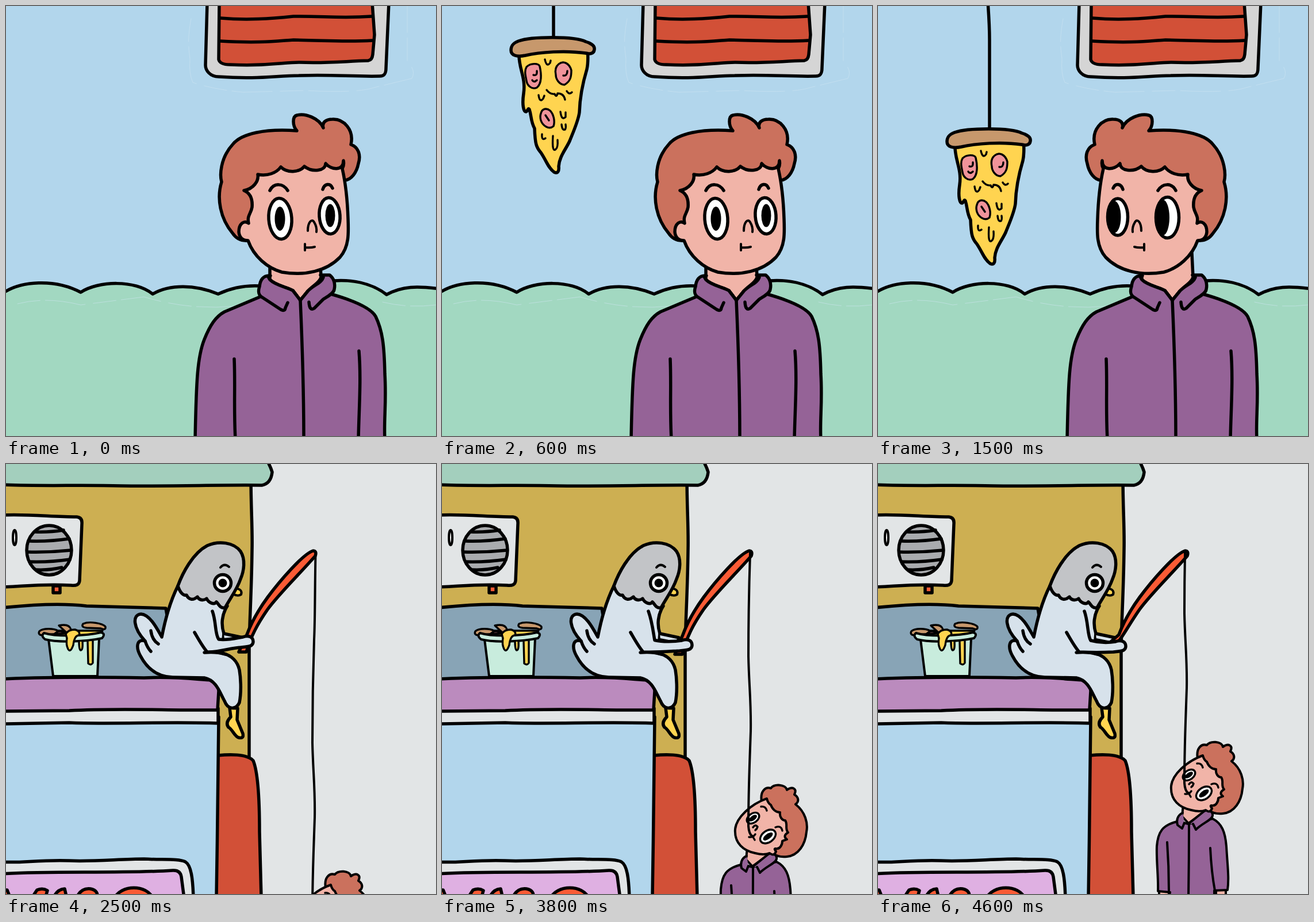
An HTML page that plays this animation: 748 px wide and 748 px high, repeating every 4700 ms.

```html
<!DOCTYPE html>
<html lang="en">
<head>
<meta charset="utf-8">
<title>Street fishing</title>
<style>
  html, body { margin: 0; width: 100%; height: 100%; overflow: hidden; background: #b2d6ec; }
  svg { display: block; width: 100%; height: 100%; }
  .ink { stroke: #000; stroke-width: 5.5; stroke-linecap: round; stroke-linejoin: round; fill: none; }
  .thin { stroke-width: 4; }
  .fine { stroke-width: 3.4; }
  .flat { stroke: none; }
  .faint { stroke: #cfe6f2; stroke-width: 1; opacity: .55; stroke-dasharray: 40 9 70 14; }
  .sky { fill: #b2d6ec; }
  .mist { fill: #e2e5e6; }
  .bush { fill: #a2d8c1; }
  .red { fill: #d25037; }
  .rod { fill: #fa5b35; }
  .hair { fill: #cb715d; }
  .skin { fill: #f1b4a8; }
  .shirt { fill: #956397; }
  .white { fill: #fff; }
  .black { fill: #000; stroke: none; }
  .crust { fill: #c7986c; }
  .cheese { fill: #ffd450; }
  .meat { fill: #f0939a; }
  .feather { fill: #d7e2eb; }
  .mint { fill: #c8ecdd; }
</style>
</head>
<body>
<svg viewBox="0 0 748 748" preserveAspectRatio="none">
  <defs>
    <clipPath id="belowTip"><path d="M0 154H748V748H0z"/></clipPath>
    <g id="headShape">
      <path class="hair" d="M420 408C408 409 400 404 394 395C373 370 366 335 375 306C372 295 372 265 395 240C410 222 450 213 506 217C498 208 498 192 506 190C520 186 545 195 552 212C549 203 556 197 568 197C587 196 606 215 600 241C612 245 618 258 613 274C610 290 600 303 589 303L570 290Z"/>
      <path class="skin" d="M421 408C431 436 455 456 480 463C520 470 558 461 581 437C597 419 596 395 595 370C594 340 590 305 585 283C588 278 588 274 587 269C587 287 566 286 556 274C556 287 533 290 519 279C510 290 489 291 478 280C470 291 455 296 438 293C440 305 430 318 414 321C426 326 429 338 428 350C426 362 419 364 422 378C415 372 405 378 405 393C406 403 411 408 421 408Z"/>
      <path d="M459 321C466 307 482 308 490 321M551 319C554 309 564 307 568 317"/>
    </g>
    <path id="noseMouth" class="thin" d="M525 391C525 376 532 369 536 376C539 381 541 386 540 393M520 414L520 425M521 420Q530 421 537 419"/>
  </defs>

  <g id="street" class="ink">
    <path class="sky flat" d="M0 0H748V748H0z"/>
    <path class="faint" d="M322 22C315 60 318 75 320 92Q318 118 325 133Q360 145 412 150L520 147Q610 152 640 142L706 126Q714 112 698 97V0"/>
    <path class="bush" d="M-6 500C25 478 85 474 130 498C160 478 225 476 255 501C285 484 328 484 369 501C395 489 420 486 441 487L570 478C600 476 635 481 662 502C690 487 715 487 754 492V754H-6Z"/>
    <path class="faint" d="M20 518Q70 505 130 520L240 506Q320 530 400 522M655 515Q700 526 748 520"/>

    <path fill="#d5d5d5" d="M350 -6L347 103C347 112 355 123 370 123C440 128 470 121 510 121C570 119 600 123 650 122C658 122 661 118 661 108L666 -6Z"/>
    <path class="red" d="M371 -6L370 93Q372 102 390 102C460 105 480 98 510 98C560 100 590 96 630 95Q637 94 638 84L641 50L637 -6Z"/>
    <path d="M373 21C420 25 460 22 500 18C550 17 580 22 636 18M373 61C440 65 470 61 500 59C560 60 590 63 637 60"/>

    <g id="pizza">
      <path d="M190 -180Q194 -130 194 -100V56"/>
      <path class="cheese" d="M134 70V86C134 110 146 125 142 152C139 172 142 184 146 184C149 184 149 176 152 180C156 192 154 200 161 213C162 240 164 246 172 255C182 270 185 282 195 289C201 292 204 288 203 279C204 262 215 250 222 235C230 215 237 200 239 185C240 150 249 120 252 110Q255 97 253 70Z"/>
      <path class="crust" d="M133 61C155 53 230 52 250 62C262 66 266 70 265 76C264 83 258 84 250 82C215 77 170 80 145 86C130 89 120 86 120 77C120 68 125 64 133 61Z"/>
      <g class="fine">
        <path class="meat" d="M147 106C154 99 168 99 170 105C173 118 174 135 165 142C156 146 148 138 147 130C145 120 143 113 147 106ZM203 101C211 94 222 100 225 112C225 122 224 131 213 137C204 137 198 127 198 120C196 111 198 105 203 101ZM172 187C174 178 182 177 188 182C194 188 197 200 194 209C186 216 175 208 172 199Q170 192 172 187Z"/>
        <path d="M159 120q7 2 6 -7M157 129q3 5 8 0M211 121q7 1 7 -8M180 190l6 9"/>
        <path d="M179 93q3 14 9 6l1 -4M168 155q2 14 8 6l2 -5M182 146q6 8 14 7q3 7 5 -1q11 0 13 11M217 148q4 7 9 2M206 184q2 16 9 9v-8M208 206q1 11 6 9q2 -3 1 -9M174 223q-1 12 6 7M193 226q-2 30 5 23q4 -3 3 -16"/>
      </g>
    </g>

    <path class="skin" d="M459 440V476C470 487 490 489 499 495L512 512L525 496C535 485 545 482 548 472L546 430"/>
    <path class="shirt" d="M329 754C331 650 333 610 345 580C355 555 365 540 380 532L444 505L499 495L512 512L525 496L565 501C600 511 634 524 643 540C655 565 658 590 659 640C662 690 657 720 659 754Z"/>
    <path class="shirt" d="M512 512L499 495C490 489 470 487 459 476Q454 470 460 469C447 468 442 477 441 488C438 497 439 503 446 507L478 528Q485 532 486 525L490 516M512 512L525 496C535 485 548 483 552 472L547 468H563C571 474 573 484 571 493C570 500 560 505 552 510L536 526Q528 531 527 515"/>
    <path d="M512 512C515 580 518 660 518 754M397 614C399 660 396 700 399 754M614 600C618 650 614 700 613 754"/>

    <g id="lookRight">
      <use href="#headShape"/><use href="#noseMouth"/>
      <ellipse class="white" cx="477" cy="370" rx="20" ry="35.5" transform="rotate(-4 477 370)"/>
      <ellipse class="black" cx="476.5" cy="370" rx="9" ry="21"/>
      <ellipse class="white" cx="563" cy="365" rx="18" ry="31.5" transform="rotate(-4 563 365)"/>
      <ellipse class="black" cx="564" cy="364.5" rx="8.5" ry="20"/>
    </g>
    <g id="lookLeft">
      <use href="#headShape" transform="matrix(-1 0 0 1 977 0)"/>
      <use href="#noseMouth" transform="matrix(-1 0 0 1 983 0)"/>
      <ellipse class="white" cx="417" cy="367" rx="17.5" ry="32"/>
      <ellipse class="black" cx="411" cy="367" rx="11.5" ry="28"/>
      <ellipse class="white" cx="503.5" cy="368" rx="20" ry="35.5"/>
      <ellipse class="black" cx="495.5" cy="368" rx="11.5" ry="31"/>
    </g>
  </g>

  <g id="stall" class="ink">
    <path class="mist flat" d="M0 0H748V748H0z"/>
    <path fill="#cdaf52" d="M-6 20H426C426 80 429 110 428 150C427 230 423 280 423 330V520H-6Z"/>
    <path fill="#88a4b6" d="M-6 250C50 244 100 242 140 247L278 251L300 380H-6Z"/>
    <path fill="#a3cfbd" d="M-6 36C60 39 130 36 200 38C300 39 370 36 445 37Q461 34 463 14Q460 4 454 -6H-6Z"/>

    <path class="rod" d="M82 212V224H94V212Z"/>
    <path class="mist" d="M-6 89C40 87 80 92 123 92Q133 93 132 104L128 203Q127 213 113 211C60 208 30 213 -6 214Z"/>
    <ellipse class="white thin" cx="15" cy="128" rx="3" ry="13"/>
    <ellipse fill="#a9abae" cx="75" cy="150" rx="39" ry="43"/>
    <path d="M50 118q26 1 50 -3M41 134q35 1 69 -4M37 153q38 1 76 -3M41 170q36 1 70 -4M53 184q22 1 44 -4"/>

    <path class="red" d="M368 507C400 504 422 507 430 516C440 540 441 600 441 640L444 754H364Z"/>
    <path class="sky" d="M-6 440H370C368 560 368 650 366 754H-6Z"/>
    <path class="mist" d="M-6 425H369V451C280 448 180 453 110 450L-6 452Z"/>
    <path fill="#bb8bbe" d="M-6 374C60 371 130 370 240 372C300 369 340 376 357 376Q370 379 370 395L368 428C280 429 200 424 110 429L-6 430Z"/>
    <path class="mist" d="M-6 692C20 695 60 688 110 690C150 692 200 687 240 687C270 689 300 686 312 692C322 698 325 720 326 756H-6Z"/>
    <path fill="#dfb0e2" d="M-6 713C70 707 200 713 290 707Q303 706 305 718L310 756H-6Z"/>
    <path class="rod" d="M-6 741H2L8 756M44 756L54 741Q64 737 72 742L68 756M82 756Q88 740 102 739L106 756M122 756Q130 737 147 739Q162 742 158 756M188 756C200 731 245 731 256 756"/>

    <g class="fine">
      <path class="cheese" d="M66 290H168L160 300H72Z"/>
      <path class="crust" d="M58 291C64 285 84 286 90 290Q91 296 82 296L63 298Q55 297 58 291Z"/>
      <path class="meat" d="M84 296Q92 287 104 294Z"/>
      <path class="crust" d="M92 281Q110 277 113 288L106 294Z"/>
      <path class="crust" d="M134 278C145 273 168 277 173 283Q174 290 165 286L140 285Q130 284 134 278Z"/>
      <path class="mint thin" d="M74 305L82 369H159L162 303Z"/>
      <path class="mint thin" d="M66 294C90 301 140 299 165 293Q174 295 167 303C140 309 90 311 68 305Q60 299 66 294Z"/>
      <path class="cheese" d="M104 296Q108 288 120 288Q130 291 127 298Q119 298 117 315Q112 329 108 322Q104 314 106 303ZM127 309q0 15 3 15q4 0 3 -15M142 309L143 347Q148 351 151 346V308"/>
    </g>

    <path class="cheese" d="M389 424L391 440Q381 450 387 458C393 460 398 475 405 476Q414 478 412 469L402 445L403 425Z"/>
    <path class="feather" d="M299 212C285 240 276 275 271 301C262 285 250 262 235 261C219 262 221 285 242 308C228 303 225 318 234 334C245 355 262 370 290 371L345 372C366 376 372 398 380 412C386 428 400 428 406 415C410 395 408 370 406 358C403 345 394 333 376 329L379 295C374 280 375 262 385 247Z"/>
    <path d="M242 308Q246 320 252 326M252 290Q254 306 265 313M345 328Q365 326 382 331"/>
    <path class="cheese thin" d="M399 216Q412 218 409 227Q403 231 395 226Z"/>
    <path fill="#c2c4c7" d="M299 212C307 190 325 155 350 142C370 133 396 136 408 152C417 166 414 186 408 200C402 218 391 232 381 250C372 252 370 243 366 240C362 246 352 241 349 234C343 239 335 236 333 231C325 238 318 236 314 228C308 230 302 222 299 212Z"/>
    <circle class="white" cx="377" cy="207" r="14.5"/>
    <circle class="black" cx="377" cy="207" r="7.5"/>
    <path class="thin" d="M373 180Q380 172 388 179"/>

    <path class="feather" d="M379 295L412 302L410 312L380 306"/>
    <path id="rod" class="rod"/>
    <path id="arm" class="feather"/>

    <g id="catch" class="thin">
      <path class="skin" d="M531 592L529 613L540 625L566 606V594ZM489 740V754H506V740ZM588 740V754H605V740Z"/>
      <path class="shirt" d="M487 743C488 720 484 690 485 665C487 640 495 628 520 622L540 626L582 617C598 625 604 640 606 665C608 700 611 720 608 741L585 742V754H506L508 745Z"/>
      <path class="shirt" d="M530 607C520 611 519 621 521 628L529 634L533 624M540 626L566 605C574 599 583 604 582 612C580 620 565 624 553 636L548 626"/>
      <path d="M541 626Q541 690 540 754M503 658Q506 700 506 742M578 668Q580 710 586 742"/>
      <path class="hair" d="M556 512C553 495 562 486 572 489C578 481 598 482 600 492C610 485 618 490 613 500C620 504 622 512 615 517C632 530 637 550 634 565C632 587 620 606 600 608C590 609 581 607 575 602Z"/>
      <path class="skin" d="M565 507C537 517 512 540 510 560C508 585 525 598 545 602Q560 606 570 602Q578 608 581 599Q577 594 580 594C588 596 592 587 592 581L600 578Q592 572 602 566C596 560 602 552 597 545C591 545 587 538 588 531C581 531 575 526 572 518Q567 515 565 507Z"/>
      <g class="fine">
        <g transform="rotate(-36 541 541)"><ellipse class="white" cx="541" cy="541" rx="12" ry="8"/><ellipse class="black" cx="541" cy="541" rx="8" ry="4"/></g>
        <g transform="rotate(-36 567 573)"><ellipse class="white" cx="567" cy="573" rx="15" ry="10"/><ellipse class="black" cx="567" cy="573" rx="10" ry="4.5"/></g>
        <path d="M555 521Q563 520 565 528M580 557Q590 553 592 563M541 557Q545 551 549 556Q548 560 545 562M534 574Q541 575 545 569M540 572L544 579"/>
      </g>
    </g>
    <g clip-path="url(#belowTip)">
      <path id="line" class="thin" d="M539 -90C537 -20 538 40 536 80C534 140 533 200 533 260C534 310 538 340 537 390C535 450 533 490 533 555Q534 568 539 572"/>
    </g>
  </g>
</svg>
<script>
const LOOP = 4700, STEP = 100, CUT = 25, TURN = 15;
const el = id => document.getElementById(id);
const show = (id, on) => el(id).style.display = on ? '' : 'none';
const shift = (id, y) => el(id).setAttribute('transform', `translate(0 ${y.toFixed(2)})`);

// Reeling poses: hand offset and where the rod's butt ends
const poses = [[0, 0, 327], [1, 8, 309], [5, 6, 331]];
const cycle = [0, 0, 1, 1, 2, 2, 2, 0, 0];

function armPath(dx, dy) {
  const p = (x, y) => `${x + dx} ${y + dy}`;
  return `M359 256C366 275 ${363 + dx} ${295 + dy / 3} 370 ${305 + dy / 4}` +
    `C385 ${307 + dy / 2} ${p(400, 303)} ${p(412, 301)}C${p(422, 297)} ${p(430, 301)} ${p(430, 309)}` +
    `C${p(430, 318)} ${p(420, 318)} ${p(408, 319)}C${p(390, 320)} 370 328 350 327C342 318 335 305 328 293`;
}

const rodPath = y => `M405 ${y}L418 ${y}C426 300 437 279 455 253C474 227 508 194 538 160` +
  `Q541 151 534 151C516 157 475 205 455 232C436 258 426 278 419 297Z`;

function drawStreet(n) {
  const k = Math.min(n, 10);
  shift('pizza', 54.55 * k - 0.925 * k * k - 294);
  show('lookRight', n < TURN);
  show('lookLeft', n >= TURN);
}

function drawStall(n) {
  const t = n / 21;
  const rise = 0.85 * t * t * (3 - 2 * t) + 0.15 * t;
  shift('catch', 225 * (1 - rise));
  shift('line', 225 * (1 - rise));
  const [dx, dy, butt] = poses[cycle[n % cycle.length]];
  el('arm').setAttribute('d', armPath(dx, dy));
  el('rod').setAttribute('d', rodPath(butt));
}

function frame() {
  const n = Math.floor(performance.now() % LOOP / STEP);
  show('street', n < CUT);
  show('stall', n >= CUT);
  if (n < CUT) drawStreet(n); else drawStall(n - CUT);
  requestAnimationFrame(frame);
}
frame();
</script>
</body>
</html>
```
